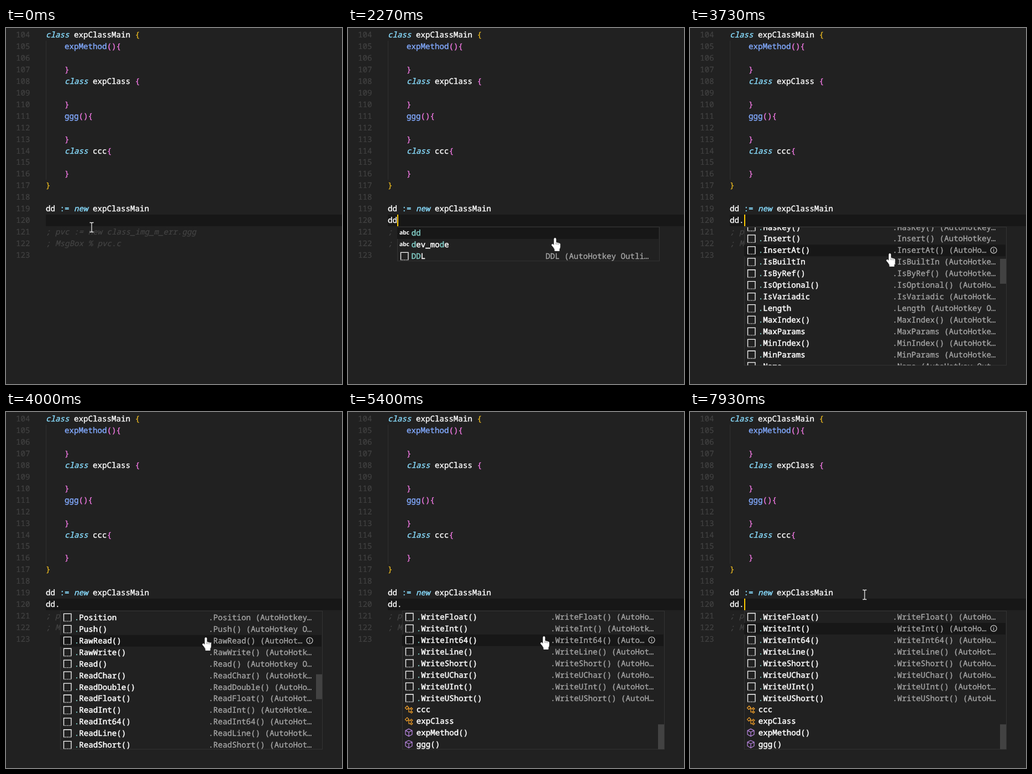
Write an HTML page that moves like this. It is 608x643 px and loops after 8 s.

```html
<!DOCTYPE html>
<html lang="en">
<head>
<meta charset="utf-8">
<title>Editor autocomplete</title>
<style>
html, body { margin: 0; width: 100%; height: 100%; overflow: hidden; background: #212121; }
svg { display: block; }
text {
  font: 500 14.17px "Noto Sans Mono", "DejaVu Sans Mono", monospace;
  white-space: pre; text-rendering: geometricPrecision;
  color: #fff; fill: currentColor; stroke: currentColor; stroke-width: .4px;
}
#popup text { stroke-width: .5px; }
.num { color: #424242; stroke-width: .2px; }
.kw { color: #89ddff; font-style: italic; }
.op { color: #89ddff; }
.fn { color: #82aaff; }
.b1 { color: #e3b420; }
.b2 { color: #f078e2; }
.note { color: #444; font-style: italic; stroke-width: .2px; }
.hit { color: #80cbc4; }
#popup .info { color: #a6a6a6; stroke-width: .35px; }
#popup .abc { font: 700 10.5px "Noto Sans", sans-serif; letter-spacing: -.3px; stroke: none; }
.line { fill: none; stroke-width: 1.3; }
</style>
</head>
<body>
<svg id="stage" width="608" height="643" viewBox="0 0 608 643">
  <rect width="608" height="643" fill="#212121"/>
  <rect x="72" y="337" width="536" height="21" fill="#171717"/>
  <rect x="72" y="23" width="1" height="251" fill="#303030"/>
  <g id="code"></g>
  <g id="typed"></g>
  <rect id="caret" y="337" width="2" height="21" fill="#ffcc00"/>
  <g id="popup"></g>
  <g id="beam">
    <path class="line" stroke="#e8e8e8" d="M-3.5-8.5h2.2q1.3 0 1.3 1.3 0-1.3 1.3-1.3h2.2M0-7.5V7.5M-3.5 8.5h2.2q1.3 0 1.3-1.3 0 1.3 1.3 1.3h2.2"/>
  </g>
  <g id="hand">
    <path fill="#fff" stroke="#fff" stroke-width=".8" d="M5 2a1.6 1.6 0 0 1 3.2 0v6.6q1.5-.8 2.5.6 1.5-.6 2.5.7 2.1-.4 2.6 1.4v5q0 2.2-1.5 4.2v3h-8.2v-2.7q-1-1.6-2-3.4L.8 13.5q-.5-1.9 1.1-2 1.2 0 2 1L5 13.8z"/>
    <path class="line" stroke="#555" style="stroke-width:.7" d="M8.2 8.8v3.4M10.7 9.4v3M13.2 10v2.6"/>
  </g>
</svg>
<script>
const LOOP = 8000, ROW = 20.93, CH = 8.502, LEFT = 72.1, TOP = 360, ROWS = 12;
const $ = id => document.getElementById(id);
const text = (x, y, cls, s) => `<text x="${x.toFixed(2)}" y="${y.toFixed(2)}" class="${cls}">${s}</text>`;

// Segments are "class|text"; the row number is the key.
const code = {
  0: ['kw|class ', 'id|expClassMain ', 'b1|{'],
  1: ['id|    ', 'fn|expMethod', 'b2|(){'],
  3: ['b2|    }'],
  4: ['kw|    class ', 'id|expClass ', 'b2|{'],
  6: ['b2|    }'],
  7: ['id|    ', 'fn|ggg', 'b2|(){'],
  9: ['b2|    }'],
  10: ['kw|    class ', 'id|ccc', 'b2|{'],
  12: ['b2|    }'],
  13: ['b1|}'],
  15: ['id|dd ', 'op|:= ', 'kw|new ', 'id|expClassMain'],
  17: ['note|; pvc := new class_img_m_err.ggg'],
  18: ['note|; MsgBox % pvc.c']
};

function drawCode() {
  let out = '';
  for (let i = 0; i < 20; i++) {
    const y = 17.2 + i * ROW;
    out += text(18, y, 'num', 104 + i);
    let col = 0;
    for (const seg of code[i] || []) {
      const [cls, s] = seg.split('|');
      const pad = s.length - s.trimStart().length;
      out += text(LEFT + (col + pad) * CH, y, cls, s.trim());
      col += s.length;
    }
  }
  $('code').innerHTML = out;
}

const items = (kind, names) => names.split(' ').map(label => ({ kind, label }));
const members = `__Call() __Delete() __Get() __Handle __New() __Set() AtEOF Clone() Close() Count()
 Delete() Encoding GetAddress() GetCapacity() HasKey() Insert() InsertAt() IsBuiltIn IsByRef()
 IsOptional() IsVariadic Length MaxIndex() MaxParams MinIndex() MinParams Name Pop() Pos Position
 Push() RawRead() RawWrite() Read() ReadChar() ReadDouble() ReadFloat() ReadInt() ReadInt64()
 ReadLine() ReadShort() ReadUChar() ReadUInt() ReadUShort() Remove() RemoveAt() Seek()
 SetCapacity() Tell() Write() WriteChar() WriteDouble() WriteFloat() WriteInt() WriteInt64()
 WriteLine() WriteShort() WriteUChar() WriteUInt() WriteUShort()`;

const lists = {
  d: {
    query: 'd', thumb: 29,
    rows: [...items('word', 'dd default dev_mode down Default'),
      ...items('snip', 'Date DateTime Days DDL Default Del Delete')]
  },
  dd: {
    query: 'dd', thumb: 0,
    rows: [...items('word', 'dd dev_mode'), ...items('snip', 'DDL')]
  },
  'dd.': {
    query: '.', thumb: 45,
    rows: [...items('snip', members.trim().split(/\s+/).map(m => '.' + m).join(' ')),
      ...items('class', 'ccc expClass'), ...items('method', 'expMethod() ggg()')]
  }
};
const MAX = (lists['dd.'].rows.length - ROWS) * ROW;

const glyph = (x, y, color, d) =>
  `<path class="line" transform="translate(${x} ${y.toFixed(2)})" stroke="${color}" d="${d}"/>`;
const icons = {
  word: y => text(4, y + 13.3, 'abc', 'abc'),
  snip: y => glyph(6, y + 3, '#fff', 'M.5 13.5V.5h13.5v13M.5 14h1.5m1.5 0h1.5m1.5 0h1.5m1.5 0h1.5m1.5 0h1.5'),
  class: y => glyph(4, y + 2, '#ee9d28', 'M1.5 5 5 1.5l3 3L4.5 8zM6.5 6.5h4M8 6.5v6h2.5M10.5 6.5l2-2 2.3 2-2 2zM10.5 12.5l2-2 2.3 2-2 2z'),
  method: y => glyph(4, y + 1.5, '#b180d7', 'M8 1.5 14 4.5v7L8 15 2 11.5v-7zM2 4.5l6 3 6-3M8 7.5V15')
};

// Letters that match the query, in order, are tinted.
function label(s, query, y) {
  let n = 0, runs = [];
  [...s].forEach((c, i) => {
    const hit = n < query.length && c.toLowerCase() === query[n];
    if (hit) n++;
    const last = runs[runs.length - 1];
    if (last && last.hit === hit) last.s += c;
    else runs.push({ hit, s: c, i });
  });
  return runs.map(r => text(25.7 + r.i * CH, y, r.hit ? 'hit' : '', r.s)).join('');
}

const clip = (s, n) => s.length > n ? s.slice(0, n - 1) + '…' : s;

function drawPopup(typed, scroll, focus) {
  const list = lists[typed];
  if (!list) return '';
  const x = Math.round(LEFT + typed.length * CH);
  const high = Math.min(ROWS, list.rows.length) * ROW - 2;
  const first = Math.floor(scroll / ROW);
  let out = '';
  for (let i = first; i <= first + ROWS && i < list.rows.length; i++) {
    const { kind, label: name } = list.rows[i], y = i * ROW - scroll;
    const on = i === focus;
    // The first row stays selected while another one is hovered.
    if (on || i === 0) out += `<rect y="${y}" width="473" height="${ROW}" fill="#171717"/>`;
    out += icons[kind](y) + label(name, list.query, y + 15);
    if (kind !== 'snip') continue;
    out += text(268.5, y + 15, 'info', clip(name + ' (AutoHotkey Outline)', on ? 20 : 22));
    if (on) out += glyph(451.5, y + 10, '#c5c5c5', 'M-5.5 0a5.5 5.5 0 1 0 11 0a5.5 5.5 0 1 0-11 0M0-3v1.4M0-.8v3.8');
  }
  if (list.thumb) {
    const y = scroll / MAX * (high - list.thumb);
    out += `<rect x="463" y="${y}" width="11" height="${list.thumb}" fill="#424242"/>`;
  }
  return `<rect x="${x + .5}" y="359.5" width="474" height="${high + .5}" fill="#212121" stroke="#343434"/>` +
    `<svg x="${x}" y="${TOP}" width="474" height="${high}" overflow="hidden">${out}</svg>`;
}

const typing = [[0, ''], [1270, 'd'], [1800, 'dd'], [2530, 'dd.']];
const blink = [[400, 930], [1270, 2270], [2530, 3000], [3530, 4000], [4470, 5000], [5530, 6000], [6470, 7000], [7530, 8000]];
const wheel = [[3400, 0], [3730, 303.5], [3800, 303.5], [4000, 606], [4200, 606], [4330, 828], [4730, 828], [5070, MAX]];
const beamPath = [[130, 155, 360], [600, 180, 362], [930, 362, 397], [7870, 362, 397], [7930, 316, 330]];
const handPath = [
  [3130, 368, 379], [3330, 367, 412], [3400, 367, 412], [3600, 355, 407],
  [5330, 355, 407], [5400, 348, 405], [6000, 169, 543], [6130, 169, 543],
  [6470, 150, 569], [6870, 150, 569], [7070, 213, 570], [7200, 213, 570],
  [7530, 180, 607], [7600, 180, 607], [7670, 172, 603], [7800, 172, 603], [7870, 250, 390]
];

function at(path, t) {
  const k = path.findIndex(p => p[0] > t);
  if (k < 0) return path[path.length - 1].slice(1);
  if (k === 0) return path[0].slice(1);
  const a = path[k - 1], b = path[k], f = (t - a[0]) / (b[0] - a[0]);
  return a.slice(1).map((v, i) => v + (b[i + 1] - v) * f);
}

const within = (t, a, b) => t >= a && t < b;
const show = (id, on) => $(id).setAttribute('visibility', on ? 'visible' : 'hidden');
const place = (id, [x, y]) => $(id).setAttribute('transform', `translate(${x.toFixed(1)} ${y.toFixed(1)})`);

function focusRow(t, scroll, handY) {
  if (t < 3200) return 0;
  if (t >= 7870) return 53;
  return Math.max(0, Math.floor((handY - TOP + scroll) / ROW));
}

let drawn = '';
function draw(now) {
  const t = Math.floor(((now % LOOP) + 4) * .015) / .015 + .01;
  const typed = typing.filter(k => k[0] <= t).pop()[1];
  const hand = at(handPath, t);
  const scroll = at(wheel, t)[0];
  const focus = focusRow(t, scroll, hand[1]);

  $('caret').setAttribute('x', Math.round(LEFT + typed.length * CH));
  show('caret', blink.some(([a, b]) => within(t, a, b)));
  place('beam', at(beamPath, t));
  place('hand', hand);
  show('beam', t < 130 || within(t, 600, 1130) || t >= 7930);
  show('hand', within(t, 1470, 7930));

  const key = [typed, scroll, focus].join();
  if (key !== drawn) {
    drawn = key;
    $('typed').innerHTML = typed ? text(LEFT, 17.2 + 16 * ROW, '', typed) : '';
    $('popup').innerHTML = drawPopup(typed, scroll, focus);
  }
}

drawCode();
const start = performance.now();
(function tick() {
  draw(performance.now() - start);
  requestAnimationFrame(tick);
})();
</script>
</body>
</html>
```
